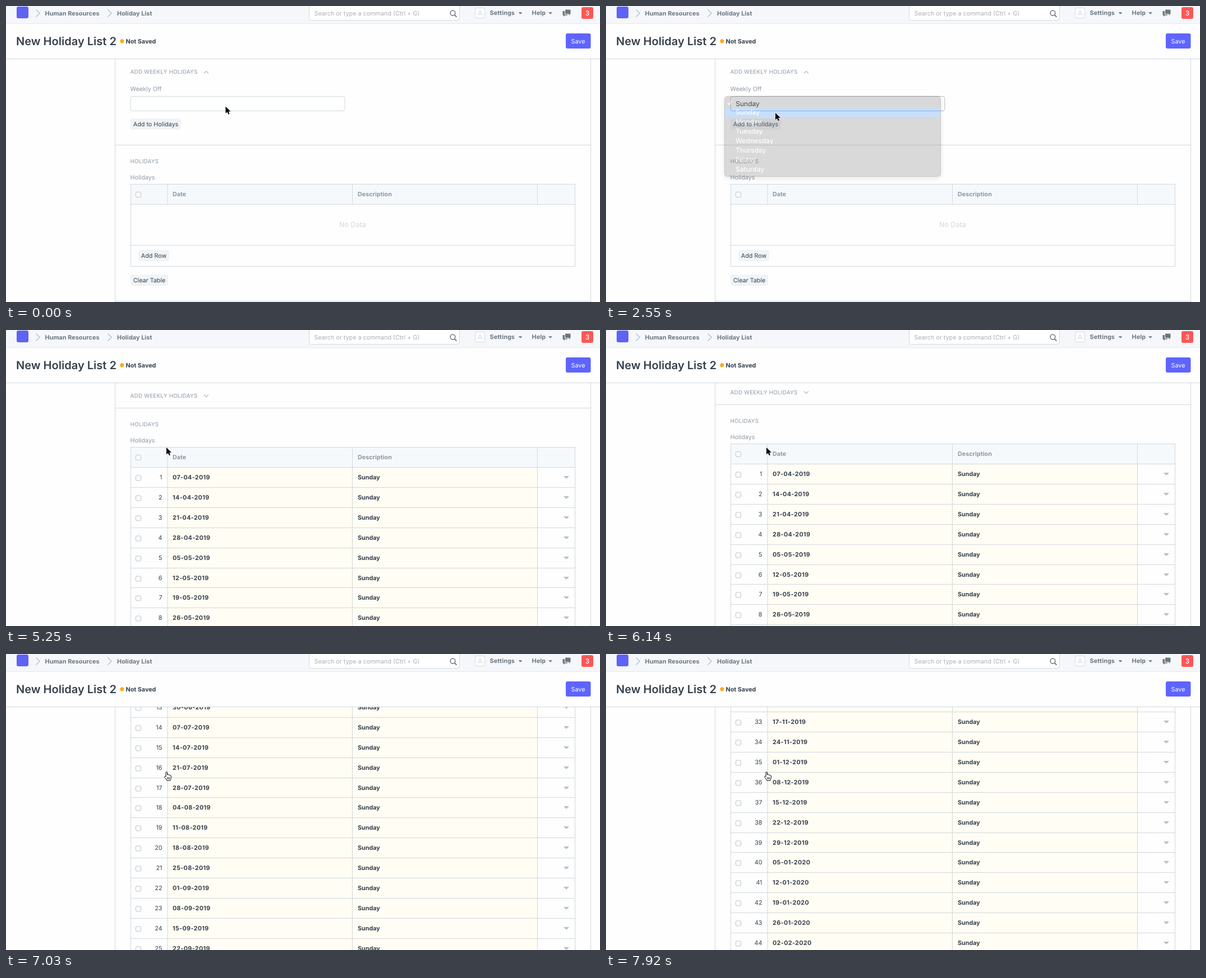
Animation of 1059 by 529 pixels, one loop 8000 ms. Source, as an HTML page:

```html
<!DOCTYPE html>
<html lang="en">
<head>
<meta charset="utf-8">
<title>Holiday List</title>
<style>
  html, body { margin: 0; width: 100%; height: 100%; overflow: hidden; background: #fefefe; }
  svg { display: block; width: 1059px; height: 529px; }
  text {
    font: 400 10.77px Inter, "Open Sans", sans-serif;
    font-optical-sizing: none;
    text-rendering: geometricPrecision;
    fill: #36414c;
    white-space: pre;
  }
  .bold { font-weight: 700; }
  .date { font-weight: 700; letter-spacing: .36px; }
  .muted { fill: #8d99a6; }
  .nav { font-weight: 700; letter-spacing: .1px; fill: #6c7680; }
  .caps { font-size: 9.88px; letter-spacing: .22px; fill: #8d99a6; }
  .title { font-size: 20.05px; font-weight: 600; }
  .empty { font-size: 12.57px; fill: #d1d8dd; }
  .value { font-size: 12px; fill: #2b333b; }
  .item { font-size: 12px; font-weight: 500; fill: #fff; }
  .white { fill: #fff; }
  .badge { font-size: 12px; font-weight: 500; fill: #fff; }
  .mid { text-anchor: middle; }
  .end { text-anchor: end; }
  .line { fill: none; stroke: #d1d8dd; }
  .arrow { fill: none; stroke: #b4bfca; stroke-width: 1.4; }
  .btn { fill: #f0f4f7; }
  .head { fill: #f6f9fc; }
  .cell { fill: #fffdf4; }
  .check { fill: #fff; stroke: #b9bec3; }
  .caret { fill: #b8bec4; }
  #menu { filter: drop-shadow(0 3px 4px rgba(0, 0, 0, .32)); }
</style>
</head>
<body>
<svg viewBox="0 0 1059 529">
  <rect width="1059" height="529" fill="#fefefe"/>
  <path class="line" d="M194.5 94V529M1042.5 94V529"/>
  <g id="open"></g>
  <g id="filled"></g>
  <g id="top"></g>
  <g id="menu"></g>
  <g id="cursor">
    <path id="pointer" d="M0 0V12.4L2.9 9.8 4.9 14.2 7 13.3 5.1 9H9Z" fill="#000" stroke="#fff" stroke-width="1" paint-order="stroke" stroke-linejoin="round"/>
    <path id="hand" d="M-.9 9.2V1.8C-.9 .2 1.5 .2 1.5 1.8V6C1.8 4.9 3.8 5 3.9 6.3 4.4 5.4 6.1 5.7 6.2 7 6.9 6.3 8.3 6.8 8.3 8V11.4C8.3 13 7.2 13.8 7 16H.6C.3 14.2-1.6 12.7-3 10.5-4.2 8.8-2.6 7.6-.9 9.2ZM1.6 10.5V13.5M3.6 10.5V13.5M5.6 10.5V13.5" fill="#fff" stroke="#000" stroke-width="1" stroke-linejoin="round"/>
  </g>
</svg>
<script>
const $ = id => document.getElementById(id);
const text = (x, y, str, cls = "") => `<text x="${x}" y="${y}" class="${cls}">${str}</text>`;
const rect = (x, y, w, h, attrs = "") => `<rect x="${x}" y="${y}" width="${w}" height="${h}" ${attrs}/>`;
const path = (d, attrs = 'class="line"') => `<path d="${d}" ${attrs}/>`;
const button = (x, y, w, label, id = "") =>
  rect(x, y, w, 20, `rx="3" class="btn" ${id && `id="${id}"`}`) + text(x + w / 2, y + 13.8, label, "mid");
const checkbox = y => rect(231.5, y - 4.5, 9, 9, 'rx="2" class="check"');
const caret = (x, y, w, fill) => path(`M${x} ${y}h${w}l${-w / 2} ${w / 2}z`, fill);

const ROWS = 52, PITCH = 35.91, FIRST = 245.5;
const DAYS = ["Sunday", "Monday", "Tuesday", "Wednesday", "Thursday", "Friday", "Saturday"];

// Section titles and the table's header row
function tableHead(y) {
  return path(`M194 ${y - 70}H1043`) +
    text(221.5, y - 37.2, "HOLIDAYS", "caps") +
    text(221.5, y - 8.6, "Holidays", "muted") +
    rect(222.5, y, 792, 36, 'class="head" stroke="#d1d8dd"') +
    path(`M288 ${y}v36M617.5 ${y}v36M947.5 ${y}v36`) +
    checkbox(y + 18.5) +
    text(297, y + 21.3, "Date", "bold muted") +
    text(627, y + 21.3, "Description", "bold muted");
}

function dateOf(i) {
  const d = new Date(Date.UTC(2019, 3, 7 + 7 * i));
  return d.toISOString().slice(0, 10).split("-").reverse().join("-");
}

const rowTop = i => Math.round(FIRST + i * PITCH - .5) + .5;

function row(i) {
  const y = rowTop(i), bottom = rowTop(i + 1);
  return rect(288, y, 659, bottom - y, 'class="cell"') +
    path(`M222.5 ${y}H1014.5V${bottom}H222.5ZM288 ${y}V${bottom}M617.5 ${y}V${bottom}M947.5 ${y}V${bottom}`) +
    checkbox(y + 19) +
    text(278.5, y + 21.4, i + 1, "end") +
    text(297, y + 21.4, dateOf(i), "date") +
    text(627, y + 21.4, "Sunday", "bold") +
    caret(994, y + 15.5, 10, 'class="caret"');
}

$("open").innerHTML =
  text(221.5, 121.3, "ADD WEEKLY HOLIDAYS", "caps") +
  path("M353 120.5l4-4 4 4", 'class="arrow"') +
  text(221.5, 152.4, "Weekly Off", "muted") +
  rect(222, 161.5, 382, 26, 'id="field" rx="4" fill="#fff" stroke="#d1d8dd"') +
  `<g id="value">${text(231.3, 178.6, "Sunday", "value")}</g>` +
  button(222, 201, 90, "Add to Holidays", "add") +
  tableHead(318.5) +
  path("M222.5 354.5V465.5H1014.5V354.5M222.5 427.5H1014.5") +
  text(618, 395.2, "No Data", "empty mid") +
  button(236, 436, 55, "Add Row") +
  button(222, 480, 67, "Clear Table") +
  path("M194 527.5H1043");

$("filled").innerHTML =
  text(221.5, 121.3, "ADD WEEKLY HOLIDAYS", "caps") +
  path("M353 115.5l4 4 4-4", 'class="arrow"') +
  tableHead(209.5) +
  Array.from({ length: ROWS }, (_, i) => row(i)).join("");

$("top").innerHTML =
  rect(0, 0, 1059, 94, 'fill="#fefefe"') +
  rect(0, 0, 1059, 31, 'fill="#f5f7fa"') +
  path("M0 31.5H1059", 'stroke="#e6eaee"') + path("M0 94.5H1059") +
  rect(19, 1, 21, 21, 'rx="3" fill="#5e62f5"') +
  path("M53.5 6.5l6.5 6.5-6.5 6.5M181.5 6.5l6.5 6.5-6.5 6.5", 'class="arrow"') +
  text(69.5, 17, "Human Resources", "nav") +
  text(198, 17, "Holiday List", "nav") +
  rect(540.5, -5, 268, 30.5, 'rx="4" fill="#fff" stroke="#d1d8dd"') +
  `<g opacity=".42">${text(549.5, 17, "Search or type a command (Ctrl + G)")}</g>` +
  path("M800 16.2l3.4 3.4", 'stroke="#6c7680" stroke-width="2"') +
  '<circle cx="796.5" cy="12.5" r="4.4" fill="none" stroke="#6c7680" stroke-width="1.5"/>' +
  rect(836.5, 3.5, 17, 18, 'rx="3" fill="#fff" stroke="#d1d8dd"') +
  text(845, 17, "A", "empty mid") +
  text(862.5, 16.4, "Settings", "nav") + caret(913.5, 11.2, 7, 'fill="#6c7680"') +
  text(937.5, 16.4, "Help", "nav") + caret(967, 11.2, 7, 'fill="#6c7680"') +
  path("M997 6.5h9.5v7.5h-1v2.7l-2.7-2.7H997z", 'fill="#6c7680"') +
  path("M992.5 9h3.5v6h5v1.5h-4l-2.8 2.5v-2.5h-1.7z", 'fill="#6c7680"') +
  rect(1026, 2, 21, 21, 'rx="3" fill="#fc5757"') +
  text(1036.5, 17, "3", "badge mid") +
  text(18, 69.8, "New Holiday List 2", "title") +
  '<circle cx="206.8" cy="62.8" r="3.6" fill="#ffa00a" fill-opacity=".9"/>' +
  text(213.5, 66.8, "Not Saved", "bold") +
  rect(998, 49, 44.5, 27, 'rx="3" fill="#5e64ff"') +
  text(1020, 66.6, "Save", "white mid");

$("menu").innerHTML =
  rect(211.5, 161.5, 385, 143, 'rx="5" fill="#858585" stroke="#4a4a4a"') +
  rect(212, 0, 384, 17, 'id="mark" fill="#4a95f8"') +
  path("M217 173.2l2.6 3.2 4.8-7", 'fill="none" stroke="#fff" stroke-width="1.7"') +
  DAYS.map((d, i) => text(231, 193.7 + i * 17.1, d, "item")).join("");

// Each track holds [start time, ...values]; values hold until the next start.
const tracks = {
  cursor: [[0, 391.5, 179.5], [750, 345, 180], [900, 304, 179], [1800, 302, 183], [1950, 302, 191],
    [3300, 297, 198], [3450, 291, 205], [3600, 287, 209], [3750, 286, 210]],
  hand: [[0, 0], [3450, 1], [5250, 0], [6430, 1]],
  menu: [[0, 0], [1200, 1], [2400, .7], [2550, .3], [2700, 0]],
  mark: [[0, -1], [1350, 0], [1800, 1], [2250, -1], [2400, 1]],
  add: [[0, "#f0f4f7"], [3450, "#cdd7df"], [4800, "#c1ccd5"]],
  scroll: [[0, 0], [6140, 6], [6290, 30], [6430, 75], [6580, 141], [6730, 272], [6880, 437], [7030, 599],
    [7180, 745], [7330, 880], [7480, 1004], [7630, 1115], [7780, 1212], [7920, 1291]]
};
const at = (name, t) => tracks[name].findLast(k => k[0] <= t).slice(1);
const show = (id, on) => $(id).setAttribute("visibility", on ? "visible" : "hidden");

function draw(now) {
  const t = now % 8000;
  const [x, y] = at("cursor", t), [hand] = at("hand", t), [mark] = at("mark", t), [alpha] = at("menu", t);
  $("cursor").setAttribute("transform", `translate(${x} ${y})`);
  show("hand", hand);
  show("pointer", !hand);
  show("menu", alpha > 0);
  $("menu").style.opacity = alpha;
  $("mark").setAttribute("y", 164.4 + 17 * mark);
  $("mark").style.opacity = mark < 0 ? 0 : 1;
  $("field").setAttribute("stroke", t < 1200 ? "#d1d8dd" : "#b3bac0");
  $("value").style.opacity = t < 2550 ? 0 : 1;
  $("add").style.fill = at("add", t)[0];
  $("open").style.display = t < 5100 ? "" : "none";
  $("filled").style.display = t < 5100 ? "none" : "";
  $("filled").setAttribute("transform", `translate(0 ${-at("scroll", t)[0]})`);
  requestAnimationFrame(draw);
}
draw(performance.now());
</script>
</body>
</html>
```
